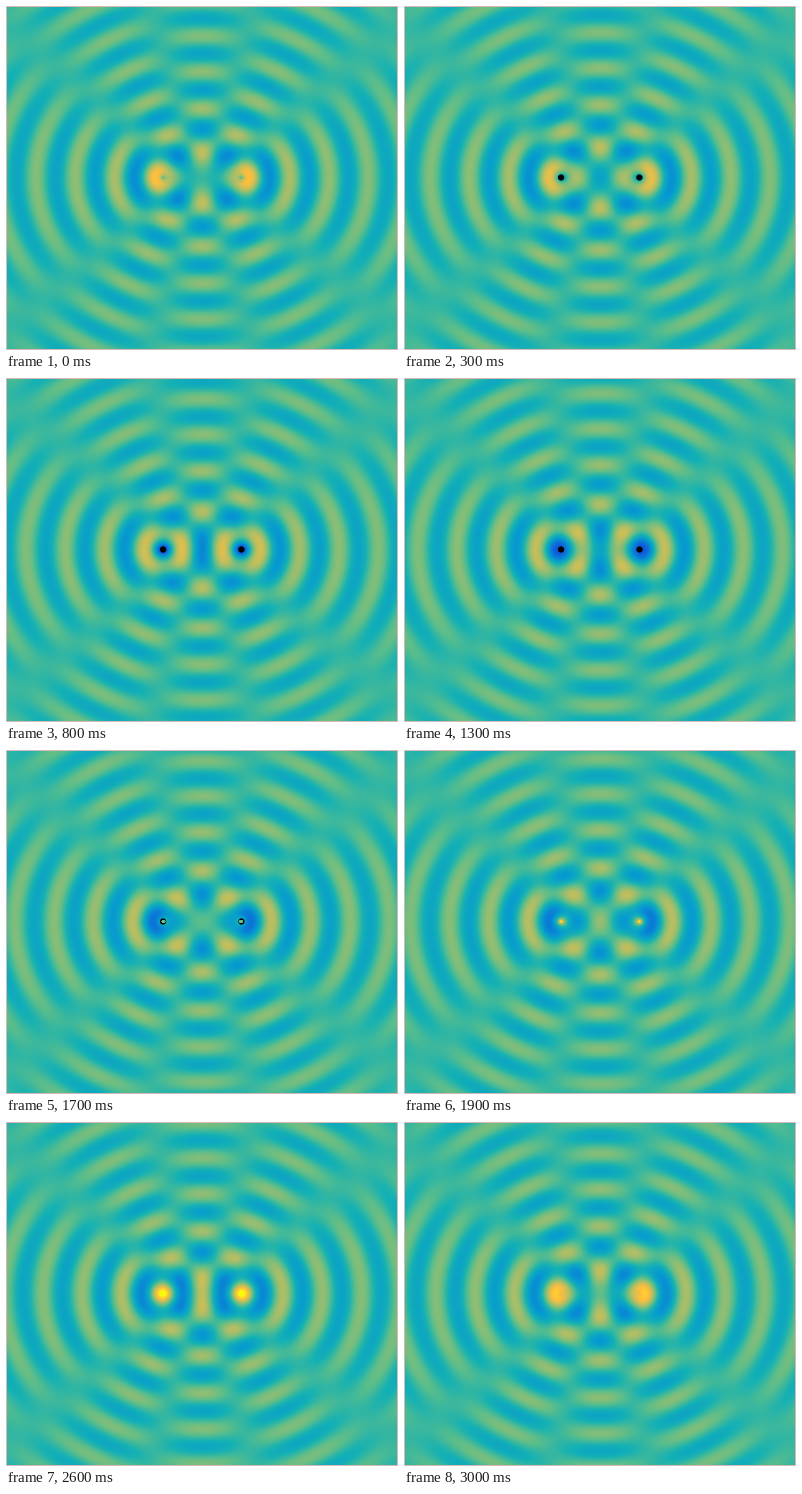
Animation of 392x344 px, one loop 3100 ms. Source, as a matplotlib script:

```python
import numpy as np
import matplotlib.pyplot as plt
from matplotlib.animation import FuncAnimation
from matplotlib.colors import LinearSegmentedColormap

W, H, DPI = 392, 344, 100
FRAMES, INTERVAL = 31, 100
PHASE_STEP = 0.2     # radians per frame
HALF_SPAN = 5.0      # wavelengths from the centre to each edge
SOURCES = (-1.0, 1.0)
CORE = 0.025         # softens the amplitude at the sources
LIMIT = 4.2
DOT_RADIUS = 3.1     # pixels
EDGE = np.array([214, 184, 182]) / 255

# Key colours from trough to crest, placed in ninths of the range.
KEYS = {0: "#352a87", 1: "#0f5cdd", 3: "#079ccf", 4: "#15b1b4",
        5: "#59bd8c", 6: "#a5be6b", 7.4: "#ffbe3d", 9: "#f9fb0e"}
cmap = LinearSegmentedColormap.from_list(
    "waves", [(k / 9, colour) for k, colour in KEYS.items()], N=1024)

# The plot box lies inside a one-pixel frame.
cx, cy = W / 2 + 0.25, (H - 1) / 2
sx, sy = (W - cx) / HALF_SPAN, cy / HALF_SPAN
px, py = np.meshgrid(np.arange(W) + 0.5 - cx, np.arange(H) + 0.5 - cy)

radii = [np.hypot(px / sx - s, py / sy) for s in SOURCES]
dots = sum(np.clip(DOT_RADIUS + 0.5 - np.hypot(px - s * sx, py), 0, 1)
           for s in SOURCES)


def picture(i):
    z = sum(np.sin(2 * np.pi * r - PHASE_STEP * i) / np.sqrt(np.hypot(r, CORE))
            for r in radii)
    rgb = cmap((z / LIMIT + 1) / 2)[..., :3]
    # The dots lie at height zero, so wave crests hide them.
    rgb *= 1 - (dots * np.clip(-4 * z, 0, 1))[..., None]
    rgb[[0, -1]] = EDGE
    rgb[:, [0, -1]] = EDGE
    return rgb


fig = plt.figure(figsize=(W / DPI, H / DPI), dpi=DPI)
ax = fig.add_axes([0, 0, 1, 1])
ax.axis("off")
image = ax.imshow(picture(0), aspect="auto", interpolation="nearest")


def update(i):
    image.set_data(picture(i))
    return [image]


anim = FuncAnimation(fig, update, frames=FRAMES, interval=INTERVAL,
                     repeat=True, repeat_delay=0, blit=False)
plt.show()
```
